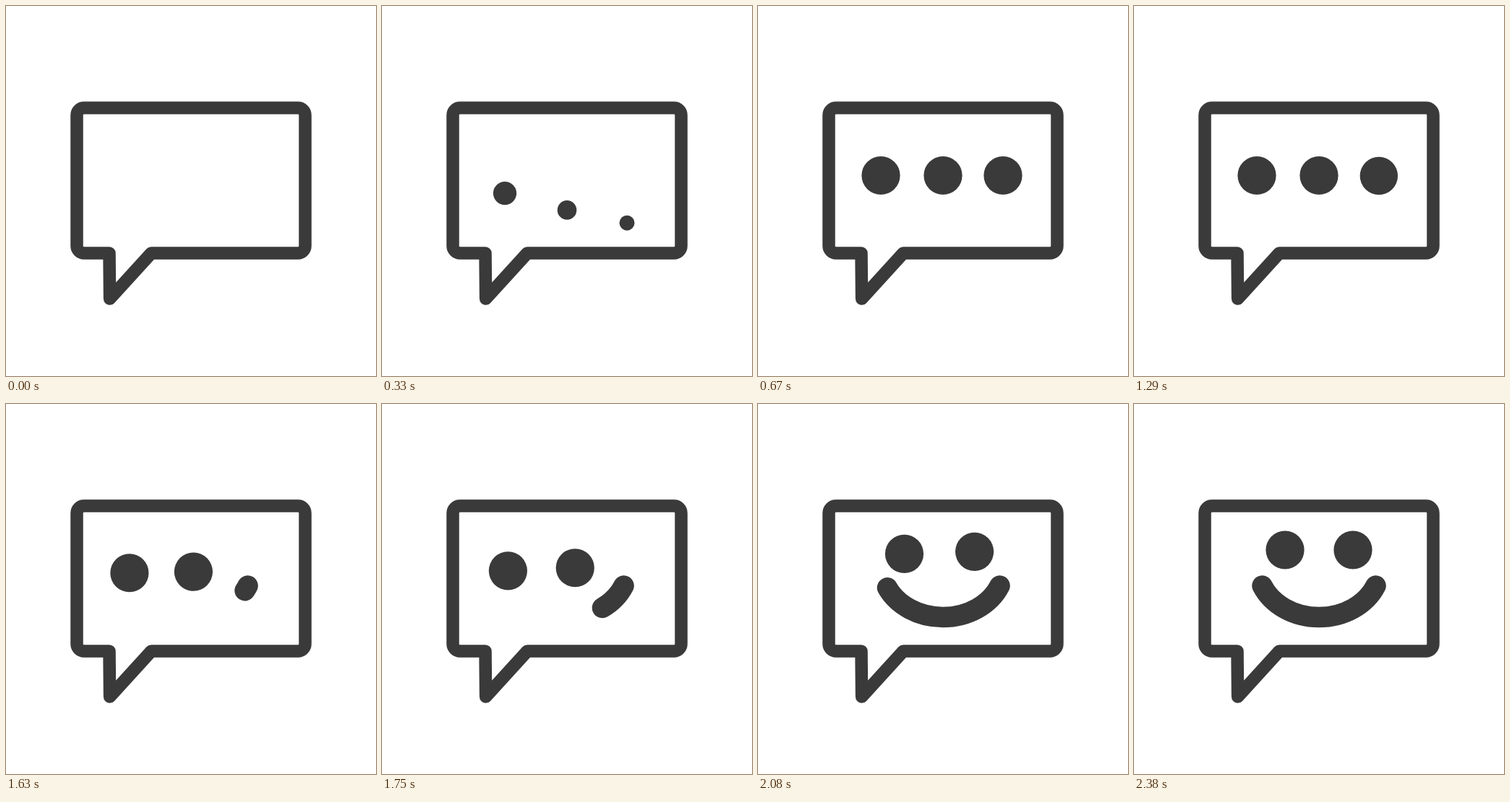
Recreate the animation shown at these times as an HTML page. Size 512 by 512 pixels, loop 3 s.

```html
<!DOCTYPE html>
<html lang="en">
<head>
<meta charset="utf-8">
<title>Smiling speech bubble</title>
<style>
  html, body { margin: 0; height: 100%; overflow: hidden; background: #fff; }
  svg { display: block; width: 100%; height: 100%; }
  path { fill: none; stroke: #3a3a3a; stroke-linejoin: round; stroke-linecap: round; }
  circle { fill: #3a3a3a; }
</style>
</head>
<body>
<svg viewBox="0 0 512 512">
  <path stroke-width="17.5" d="M143 342H108a10 10 0 0 1-10-10V151a10 10 0 0 1 10-10H404a10 10 0 0 1 10 10V332a10 10 0 0 1-10 10H201L143.6 405Z"/>
  <circle/><circle/><circle/>
  <path id="smile" pathLength="1" stroke-width="28.5" d="M334.5 251.5C321.5 277 291.3 295 256 295S190.5 277 177.5 251.5"/>
</svg>
<script>
const FPS = 24, FRAMES = 72, RADIUS = 26.6, REST_Y = 234.5, RISE = 85;
const dots = document.querySelectorAll('circle');
const smile = document.getElementById('smile');

// Cubic easing with control points (x1, 0) and (x2, 1).
const ease = (x1, x2) => x => {
  if (x <= 0) return 0;
  if (x >= 1) return 1;
  let lo = 0, hi = 1, u;
  for (let i = 0; i < 24; i++) {
    u = (lo + hi) / 2;
    const at = 3 * (1 - u) * u * ((1 - u) * x1 + u * x2) + u ** 3;
    if (at < x) lo = u; else hi = u;
  }
  return u * u * (3 - 2 * u);
};
const grow = ease(1 / 3, 2 / 3);
const rise = ease(0.79, 0.25);
const glide = ease(0.6, 0.4);
const mix = (a, b, p) => a + (b - a) * p;

// Each dot moves from its resting place to its part of the face.
const moves = [
  { x: 170, toX: 209, toY: 202, toR: RADIUS, start: 36, length: 21 },
  { x: 256, toX: 303, toY: 202, toR: RADIUS, start: 34, length: 21 },
  { x: 339, toX: 334.5, toY: 251.5, toR: 14.25, start: 30, length: 6 }
];
const SMILE_START = 36, SMILE_LENGTH = 16, POP_LENGTH = 14;

function draw(frame) {
  moves.forEach((m, i) => {
    const pop = (frame - i) / POP_LENGTH;
    const p = glide((frame - m.start) / m.length);
    const dot = dots[i];
    dot.setAttribute('cx', mix(m.x, m.toX, p));
    dot.setAttribute('cy', mix(REST_Y, m.toY, p) + RISE * (1 - rise(pop)));
    dot.setAttribute('r', mix(RADIUS, m.toR, p) * grow(pop));
  });
  const smiling = frame >= SMILE_START;
  dots[2].style.display = smiling ? 'none' : '';
  smile.style.display = smiling ? '' : 'none';
  smile.setAttribute('stroke-dasharray', glide((frame - SMILE_START) / SMILE_LENGTH) + ' 2');
}

const begin = performance.now();
function tick() {
  const elapsed = performance.now() - begin;
  draw(Math.floor((elapsed + 4) * FPS / 1000) % FRAMES);
  requestAnimationFrame(tick);
}
tick();
</script>
</body>
</html>
```
